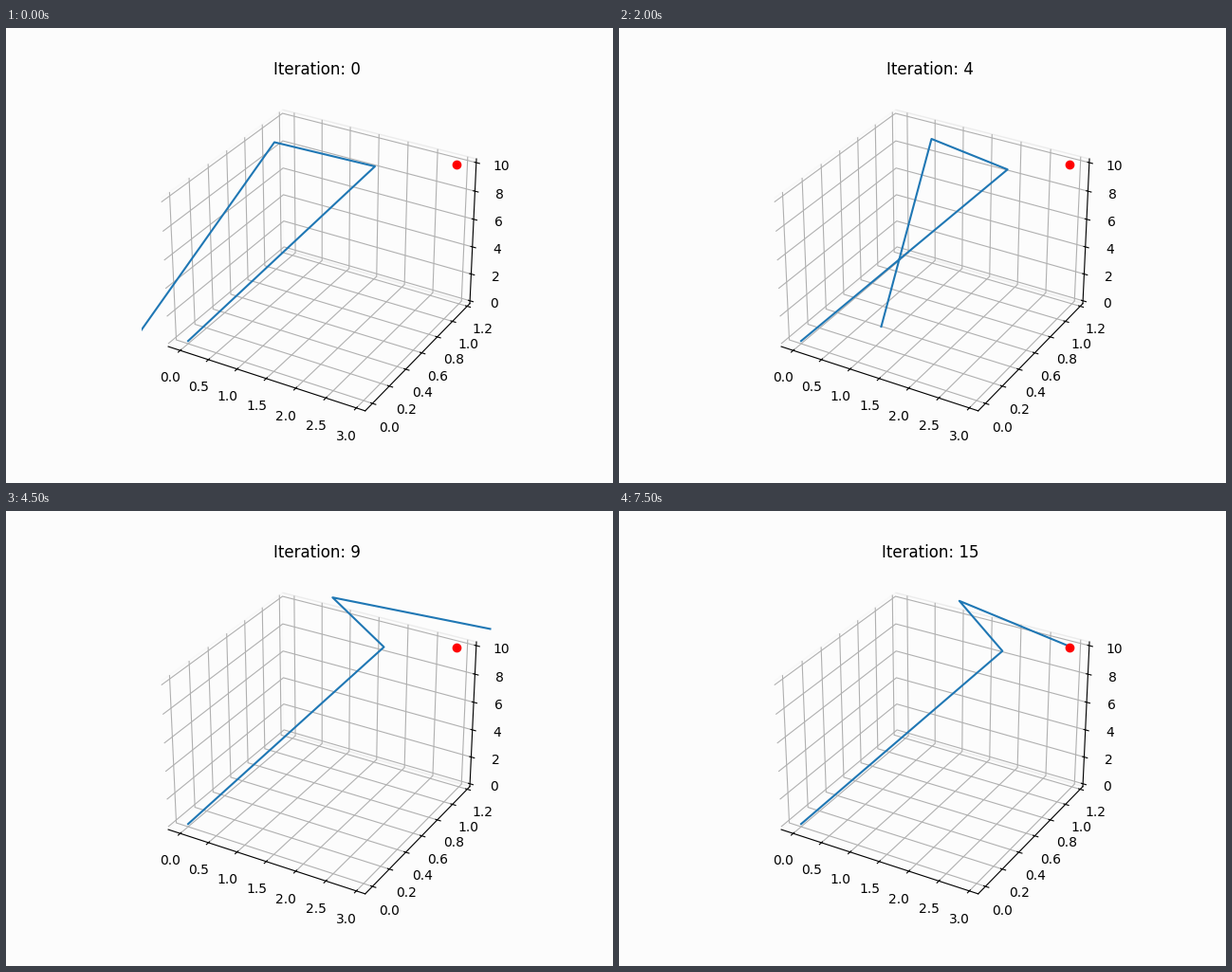
Recreate the animation shown at these times as a matplotlib script. Size 640 px wide and 480 px high, loop 8000 ms.

```python
import numpy as np
import matplotlib.pyplot as plt
from matplotlib.animation import FuncAnimation
from matplotlib.lines import Line2D
from matplotlib.transforms import Affine2D

WIDTH, HEIGHT, DPI = 640, 480, 100
PAPER = "#fcfcfc"
GOAL = (2.93, 1.152, 10.05)
BASE = (192, 330.2)

# Key poses of the solver by step: elbow, wrist, tip in screen pixels.
# The steps between them are blended; it rests before the first and
# after the last.
KEYS = {
    1: [(389, 146), (283, 120.5), (129, 338)],
    3: [(417, 157), (314, 129), (281.5, 361)],
    5: [(402.3, 141.5), (345, 105), (271.5, 269)],
    7: [(425.3, 150.5), (389.5, 97.8), (532, 149.3)],
    9: [(398.5, 143.5), (344.3, 91.2), (510.5, 124.4)],
    11: [(407.6, 147.6), (372.7, 85.5), (481.5, 128.2)],
    14: [(404.3, 147.7), (358.8, 94.8), (475.5, 143)],
}


def arm_at(step):
    """Joint positions at a step, from the base to the tip."""
    coords = np.reshape(list(KEYS.values()), (len(KEYS), -1)).T
    joints = [np.interp(step, list(KEYS), c) for c in coords]
    return np.vstack([BASE, np.reshape(joints, (-1, 2))])


def padded(top, margin):
    """Limits for data from 0 to top, plus the 3D view margin."""
    low, high = -margin * top, (1 + margin) * top
    pad = (high - low) / 48
    return low - pad, high + pad


fig = plt.figure(figsize=(WIDTH / DPI, HEIGHT / DPI), dpi=DPI, facecolor=PAPER)
ax = fig.add_subplot(projection="3d", facecolor=PAPER)

ax.plot(*[[v] for v in GOAL], "ro", zorder=3)
ax.set_xlim(padded(GOAL[0], 0.05))
ax.set_ylim(padded(GOAL[1], 0.05))
ax.set_zlim(padded(GOAL[2], 0))
ax.set_xticks(np.arange(7) * 0.5)
ax.set_yticks(np.arange(7) * 0.2)
ax.set_zticks(range(0, 11, 2))

for axis, edge in zip((ax.xaxis, ax.yaxis, ax.zaxis),
                      ("#f8f8f8", "#ececec", "#f0f0f0")):
    axis.pane.set_alpha(1)
    axis.pane.set_facecolor(PAPER)
    axis.pane.set_edgecolor(edge)

# The arm lives in screen pixels, clipped to the axes square.
screen = Affine2D().scale(1, -1).translate(0, HEIGHT)
arm = Line2D([], [], color="C0", lw=1.5, transform=screen, zorder=2)
ax.add_artist(arm)
title = ax.set_title("")


def draw(step):
    arm.set_data(*arm_at(step).T)
    title.set_text(f"Iteration: {step}")
    return arm, title


ani = FuncAnimation(fig, draw, frames=16, interval=500, repeat=True,
                    repeat_delay=0)
plt.show()
```
